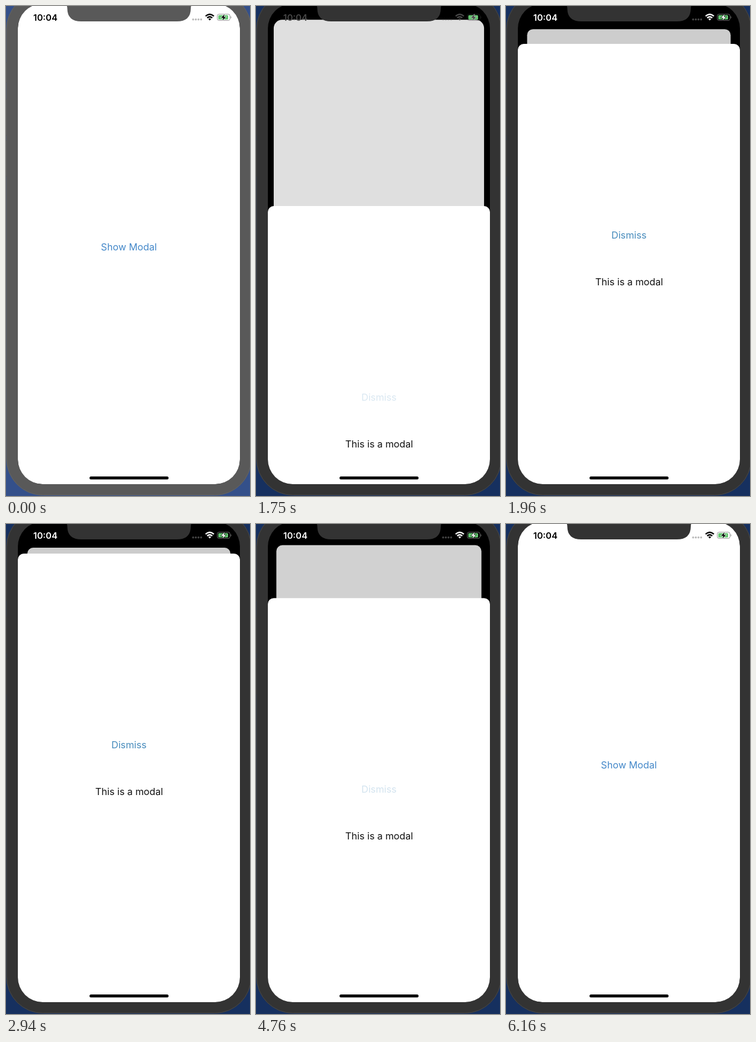
Recreate the animation shown at these times as an HTML page. Size 412 px wide and 828 px high, loop 6230 ms.

```html
<!DOCTYPE html>
<html lang="en">
<head>
<meta charset="utf-8">
<title>Modal sheet</title>
<style>
  html, body { margin: 0; width: 100%; height: 100%; overflow: hidden; }
  svg { display: block; width: 412px; height: 828px; }
  text { font: 16.2px Inter, "Open Sans", sans-serif; text-anchor: middle; }
  #desk { fill: var(--desk); }
  .bezel { fill: var(--bezel); }
  .edge { fill: none; stroke: var(--edge); }
  .key { fill: var(--bezel); stroke: #222; stroke-opacity: .6; }
  .clock { font-size: 15px; font-weight: 600; }
  .ink { fill: var(--ink); }
  .line { fill: none; stroke: var(--ink); }
</style>
</head>
<body>
<svg viewBox="0 0 412 828">
  <defs>
    <clipPath id="display"><rect x="20" y="-4" width="375" height="812" rx="42"/></clipPath>
  </defs>
  <rect id="desk" width="412" height="828"/>
  <g class="key">
    <rect x="-3" y="95.5" width="5" height="34"/>
    <rect x="-3" y="157.5" width="5" height="61"/>
    <rect x="-3" y="227.5" width="5" height="60"/>
  </g>
  <rect class="bezel" x=".5" y="-23" width="414" height="850" rx="62"/>
  <rect class="edge" x="1" y="-22.5" width="413" height="849" rx="61.5"/>

  <g clip-path="url(#display)">
    <rect x="20" y="-4" width="375" height="812"/>
    <g id="page">
      <rect class="page-shape" width="375" height="812" fill="#fff"/>
      <text id="show" x="187.5" y="417" fill="#4488c9">Show Modal</text>
      <rect id="dim" class="page-shape" width="375" height="812"/>
    </g>
    <g id="sheet">
      <rect x="20" width="375" height="820" rx="10" fill="#fff"/>
      <text id="dismiss" x="207.7" y="329" fill="#468bbc">Dismiss</text>
      <text x="208" y="408" fill="#111">This is a modal</text>
    </g>

    <text class="clock ink" x="66.5" y="24.5">10:04</text>
    <g class="ink" opacity=".27">
      <circle cx="316" cy="22.7" r="1.7"/><circle cx="320.5" cy="22.7" r="1.7"/>
      <circle cx="325" cy="22.7" r="1.7"/><circle cx="329.5" cy="22.7" r="1.7"/>
    </g>
    <g class="line" stroke-width="2.3">
      <path d="M337 17.2Q344 10.8 351 17.2"/>
      <path d="M339.7 20.1Q344 16.3 348.3 20.1"/>
    </g>
    <path class="ink" d="M344 24.6l-2.4-2.5q2.4-2 4.8 0z"/>
    <rect class="line" x="356.8" y="13.8" width="21.4" height="10.6" rx="3" opacity=".4"/>
    <path class="ink" d="M379.4 17q2.4 2.1 0 4.2z" opacity=".4"/>
    <rect x="358.5" y="15.5" width="16.5" height="7.2" rx="1.5" fill="#63c670"/>
    <path class="ink" d="M369 13.8l-5.8 6.1h3.6l-1.2 4.6 5.8-6.1h-3.6z"
          stroke="var(--halo)" stroke-width="1.2" paint-order="stroke"/>
  </g>

  <path class="bezel" d="M95-5Q103.5-4 103.5 4Q103.5 26 127 26H288.500Q312 26 312 4Q312-4 320-5z"/>
  <rect x="141" y="795" width="133.500" height="5" rx="2.5"/>
</svg>
<script>
const LOOP = 6230, STEP = 70;
const OPEN = 1635, CLOSE = 4731, ACTIVATE = 980;
const $ = id => document.getElementById(id);
const pageShapes = document.querySelectorAll('.page-shape');
const root = document.documentElement.style;

const ramp = (t, from, to) => Math.min(1, Math.max(0, (t - from) / (to - from)));
const smooth = (t, from, to) => { const x = ramp(t, from, to); return x * x * (3 - 2 * x); };
const gray = v => `rgb(${v},${v},${v})`;

// Critically damped spring from 0 to 1.
function spring(ms) {
  const x = Math.max(0, ms) * 0.01825;
  return 1 - (1 + x) * Math.exp(-x);
}

// Button opacity: fades while held, returns after release.
const pressed = (t, down, up) =>
  1 - 0.8 * (ramp(t, down, down + 260) - smooth(t, up, up + 400));

function draw(t) {
  const active = t >= ACTIVATE;
  root.setProperty('--desk', active ? '#16305f' : '#34508a');
  root.setProperty('--bezel', active ? '#333' : '#595959');
  root.setProperty('--edge', active ? '#484848' : '#646464');

  const light = Math.round(255 * (smooth(t, OPEN, OPEN + 330) - smooth(t, CLOSE, CLOSE + 330)));
  root.setProperty('--ink', gray(light));
  root.setProperty('--halo', gray(255 - light));

  const p = t < CLOSE ? spring(t - OPEN) : 1 - spring(t - CLOSE);
  const scale = 1 - 32 / 375 * p;
  $('page').setAttribute('transform', `translate(${20 + 16 * p} ${-4 + 44 * p}) scale(${scale})`);
  pageShapes.forEach(r => r.setAttribute('rx', (10 + 30 * (1 - p) ** 2) / scale));
  $('dim').setAttribute('opacity', 0.2 * p);
  $('sheet').setAttribute('transform', `translate(0 ${808 - 758 * p})`);

  $('show').setAttribute('opacity', pressed(t, 930, 1580));
  $('dismiss').setAttribute('opacity',
    t < 4000 ? 0.2 + 0.8 * ramp(t, 1750, 1900) : pressed(t, 4010, 4710));
}

function tick(now) {
  draw(Math.floor(now % LOOP / STEP) * STEP);
  requestAnimationFrame(tick);
}
draw(0);
requestAnimationFrame(tick);
</script>
</body>
</html>
```
